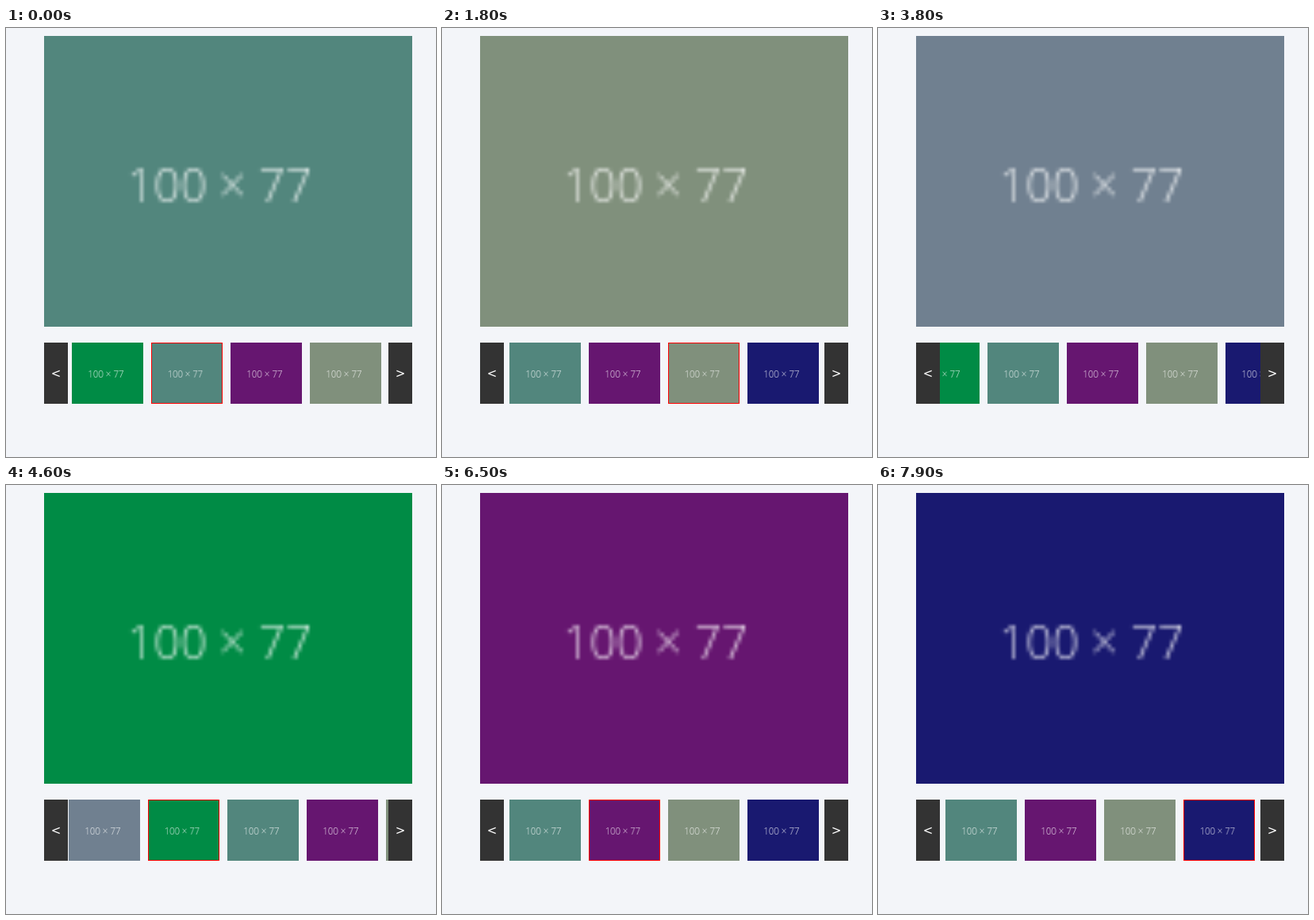
These frames come from a looping animation (542 by 540 pixels, 8000 ms). An HTML page with a canvas:

```html
<!DOCTYPE html>
<html lang="en">
<head>
<meta charset="utf-8">
<title>Thumbnail carousel</title>
<style>
  html, body { margin: 0; width: 100%; height: 100%; overflow: hidden; background: #f3f5f9; }
  canvas { display: block; }
</style>
</head>
<body>
<canvas id="stage" width="542" height="540"></canvas>
<script>
const ctx = document.getElementById('stage').getContext('2d');
const LOOP = 8000, TICK = 100, SLIDE = 460;
const colors = ['#708090', '#008b45', '#52867d', '#661670', '#80907c', '#191970'];

// Each click: time it shows, picture chosen, how long the slide has already run.
const clicks = [
  { at: 0, pick: 2, lead: 41 },
  { at: 900, pick: 3, lead: 0 },
  { at: 1800, pick: 4, lead: 0 },
  { at: 2700, pick: 5, lead: 0 },
  { at: 3700, pick: 0, lead: 59 },
  { at: 4600, pick: 1, lead: 73 },
  { at: 5500, pick: 2, lead: 59 },
  { at: 6500, pick: 3, lead: 0 },
  { at: 7200, pick: 4, lead: 0 },
  { at: 7900, pick: 5, lead: 0 }
];

// Small pictures, enlarged for the main view so the lettering goes soft.
function makePicture(color) {
  const pic = document.createElement('canvas');
  pic.width = 100;
  pic.height = 77;
  const c = pic.getContext('2d');
  c.fillStyle = color;
  c.fillRect(0, 0, 100, 77);
  c.font = '300 12.7px "Open Sans", "Noto Sans", sans-serif';
  c.fillStyle = 'rgba(255,255,255,0.85)';
  c.fillText('100 × 77', 22.6, 44);
  return pic;
}

const pictures = colors.map(makePicture);
const scrollFor = pick => Math.min(pick, 2) * 100;
const swing = p => 0.5 - Math.cos(Math.PI * p) / 2;

function drawThumb(i, x, selected) {
  if (selected) {
    ctx.fillStyle = '#ff0000';
    ctx.fillRect(x, 396, 90, 77);
    ctx.drawImage(pictures[i], x + 1, 397, 88, 75);
  } else {
    ctx.drawImage(pictures[i], x, 396, 90, 77);
  }
}

function drawButton(x, label) {
  ctx.fillStyle = '#333333';
  ctx.fillRect(x, 396, 30, 77);
  ctx.fillStyle = '#ffffff';
  ctx.fillText(label, x + 15, 440);
}

function draw(t) {
  let n = clicks.length - 1;
  while (clicks[n].at > t) n--;
  const { at, pick, lead } = clicks[n];
  const from = scrollFor(n ? clicks[n - 1].pick : 1);
  const p = Math.min((t - at + lead) / SLIDE, 1);
  const scroll = Math.round(from + (scrollFor(pick) - from) * swing(p));

  ctx.fillStyle = '#f3f5f9';
  ctx.fillRect(0, 0, 542, 540);

  ctx.save();
  ctx.beginPath();
  ctx.rect(48, 10, 464, 366);
  ctx.clip();
  ctx.drawImage(pictures[pick], 48, 10, 464, 366);
  ctx.restore();

  ctx.save();
  ctx.beginPath();
  ctx.rect(78, 396, 404, 77);
  ctx.clip();
  pictures.forEach((_, i) => drawThumb(i, 85 + i * 100 - scroll, i === pick));
  ctx.restore();

  drawButton(48, '<');
  drawButton(482, '>');
}

ctx.imageSmoothingQuality = 'medium';
ctx.textAlign = 'center';
ctx.font = '15px "DejaVu Sans", sans-serif';

const start = performance.now();
function frame() {
  const t = (performance.now() - start) % LOOP;
  draw(Math.floor(t / TICK) * TICK);
  requestAnimationFrame(frame);
}
frame();
</script>
</body>
</html>
```
